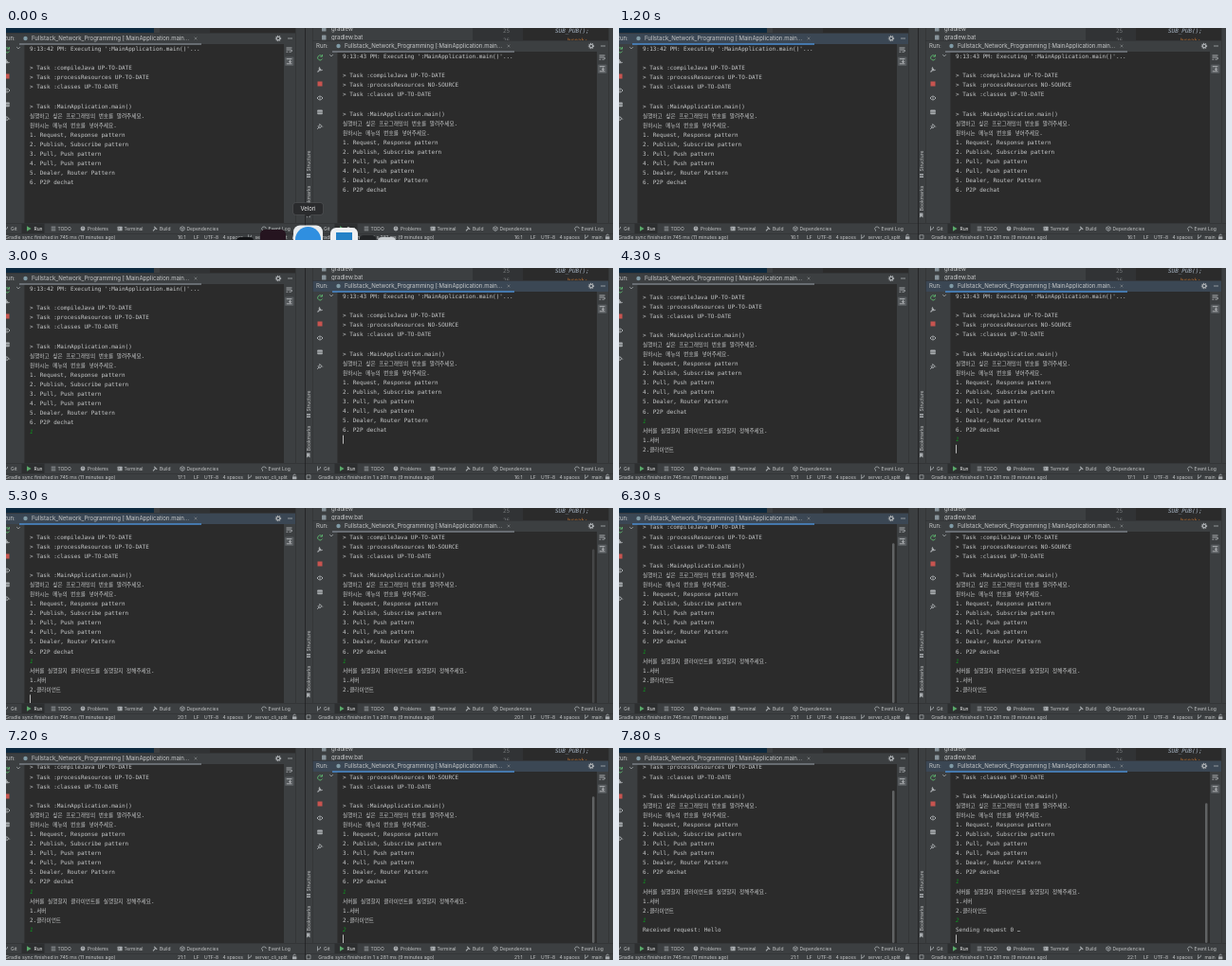
Write an HTML page with a canvas that moves like this. It is 640 by 224 pixels and loops after 8 s.

```html
<!DOCTYPE html>
<html lang="ko">
<head>
<meta charset="utf-8">
<style>
html, body { margin: 0; width: 640px; height: 224px; overflow: hidden; background: #2b2b2b; }
canvas { display: block; }
</style>
</head>
<body>
<canvas id="stage" width="640" height="224"></canvas>
<script>
const g = document.getElementById('stage').getContext('2d');
const LOOP = 8000, ROW = 10.08, ADVANCE = 3.6, BOTTOM = 206;
const PANEL = '#3c3f41', EDITOR = '#2b2b2b', GUTTER = '#313335', LINE = '#323334';
const TEXT = '#c6c8c9', ICON = '#a8acaf';
const UI = 'Inter, sans-serif';
const MONO = '5.98px "DejaVu Sans Mono", monospace';
const HANGUL = '500 5.62px "Noto Sans CJK KR", "Noto Sans CJK", sans-serif';

const banner = (sec, res) => `9:13:${sec} PM: Executing ':MainApplication.main()'...

> Task :compileJava UP-TO-DATE
> Task :processResources ${res}
> Task :classes UP-TO-DATE

> Task :MainApplication.main()
실행하고 싶은 프로그래밍의 번호를 알려주세요.
원하시는 메뉴의 번호를 넣어주세요.
1. Request, Response pattern
2. Publish, Subscribe pattern
3. Pull, Push pattern
4. Pull, Push pattern
5. Dealer, Router Pattern
6. P2P dechat
`;
const question = '서버를 실행할지 클라이언트를 실행할지 정해주세요.\n1.서버\n2.클라이언트\n';

// focus: intervals with keyboard focus; steps: [time, text added to the console]
const left = {
  dx: 0, dy: 0, focus: [[700, 2700], [5300, 6500]],
  sync: '745 ms (11 minutes ago)', branch: 'server_cli_split', statusX: 181,
  steps: [[0, banner(42, 'UP-TO-DATE')], [1600, '1'], [2100, '\n'], [3400, question],
    [5600, '1'], [5800, '\n'], [7700, 'Received request: Hello\n']]
};
const right = {
  dx: 330, dy: 8, focus: [[2700, 5300], [6500, LOOP]],
  sync: '1 s 281 ms (9 minutes ago)', branch: 'main', statusX: 206,
  steps: [[0, banner(43, 'NO-SOURCE')], [3200, '1'], [3500, '\n'], [4000, ''], [4500, question],
    [6800, '2'], [7100, '\n'], [7600, 'Sending request 0 …\n']]
};

function box(x, y, w, h, color) {
  g.fillStyle = color;
  g.fillRect(x, y, w, h);
}
function disc(x, y, r, color) {
  g.fillStyle = color;
  g.beginPath();
  g.arc(x, y, r, 0, 7);
  g.fill();
}
function round(x, y, w, h, r, color) {
  g.fillStyle = color;
  g.beginPath();
  g.roundRect(x, y, w, h, r);
  g.fill();
}
function stroke(path, x, y, color = ICON, width = 0.8) {
  g.save();
  g.translate(x, y);
  g.strokeStyle = color;
  g.lineWidth = width;
  g.stroke(new Path2D(path));
  g.restore();
}
// y is the visual middle of the letters
function label(s, x, y, size = 6.05, color = TEXT) {
  g.font = `${size}px ${UI}`;
  g.fillStyle = color;
  g.fillText(s, x, y + size * 0.35);
}
function code(s, x, y, color, style = '') {
  g.font = style + MONO;
  g.fillStyle = color;
  g.fillText(s, x, y + 2.1);
}
function consoleText(s, x, y) {
  if (/^[12]$/.test(s)) return code(s, x, y, '#0c961f', 'italic ');
  g.fillStyle = TEXT;
  for (const part of s.match(/[가-힣]+|[^가-힣]+/g) || []) {
    g.font = /[가-힣]/.test(part) ? HANGUL : MONO;
    g.fillText(part, x, y + 2.1);
    x += g.measureText(part).width;
  }
}

const rowsAt = (win, t) =>
  win.steps.filter(s => s[0] <= t).map(s => s[1]).join('').split('\n');
const lastBefore = (times, t) => Math.max(0, ...times.filter(v => v <= t));

function drawConsole(win, t, active) {
  const top = 17 + win.dy, height = BOTTOM - top;
  const rows = rowsAt(win, t), last = rows.length - 1;
  const shift = Math.max(0, 22 + win.dy + ROW * last - 201.8);
  const rowY = i => 22 + win.dy + ROW * i - shift;

  g.save();
  g.beginPath();
  g.rect(20, top, 273, height);
  g.clip();
  box(20, top, 273, height, EDITOR);
  rows.forEach((s, i) => consoleText(s, 25, rowY(i)));

  const starts = win.focus.map(f => f[0]);
  const times = win.steps.map(s => s[0]);
  const idle = t - lastBefore([...starts, ...times], t);
  if (active && idle % 1000 < 500) {
    box(25 + ADVANCE * rows[last].length, rowY(last) - 4.5, 1, 9, '#bbbbbb');
  }

  const scrolled = lastBefore(win.steps.filter(s => s[1].endsWith('\n')).map(s => s[0]), t);
  const alpha = Math.min(1, (850 - t + scrolled) / 100);
  if (shift && alpha > 0) {
    const thumb = height * height / (ROW * rows.length);
    g.globalAlpha = alpha;
    round(288, BOTTOM - thumb, 2.5, thumb, 1.2, '#606263');
  }
  g.restore();
}

function drawSideIcons(dy) {
  const x = 1;
  stroke('M2 -2 A2.6 2.6 0 1 0 2.6 1 M2.5 -3.5 V-1.3 H0.3', x, 23.5 + dy, '#59a869', 1);
  stroke('M-2.5 2.5 L1 -1 M0 -2.5 A1.8 1.8 0 1 0 2.5 0', x, 36 + dy, ICON, 1.1);
  box(x - 2.5, 48.5 + dy, 5, 5, '#c75450');
  stroke('M-3 0 Q0 -4 3 0 Q0 4 -3 0 M-.8 0 H.8', x, 66 + dy, ICON, 1);
  round(x - 2.8, 78.5 + dy, 5.6, 4.8, 0.8, ICON);
  box(x - 2.8, 80.7 + dy, 5.6, 0.6, PANEL);
  stroke('M-.5 -2.8 L2.8 .5 M.3 -2 L-1.6 .2 M2 -.3 L-.2 1.6 M-2 -.4 L.4 2 M-.8 .8 L-2.8 2.8', x, 96 + dy, ICON, 1);
  stroke('M-1.8 -.9 L0 .9 L1.8 -.9', 13, 21 + dy, ICON, 0.8);
}

function drawHeader(dy, active) {
  const y = 11 + dy;
  box(-7, 5 + dy, 312, 12, active ? '#3b4754' : PANEL);
  box(-7, 5 + dy, 312, 0.7, LINE);
  label('Run:', -3, y);
  disc(20.5, y, 2.2, '#7f9aa5');
  label('Fullstack_Network_Programming [:MainApplication.main...', 27, y);
  stroke('M-1.4 -1.4 L1.4 1.4 M1.4 -1.4 L-1.4 1.4', 200, y, '#8a8d8f', 0.6);
  g.setLineDash([1, 0.8]);
  stroke('M2.6 0 A2.6 2.6 0 1 1 2.6 -.01', 287, y, ICON, 1.2);
  g.setLineDash([]);
  stroke('M1.7 0 A1.7 1.7 0 1 1 1.7 -.01', 287, y, ICON, 1.2);
  stroke('M-2.5 0 H2.5', 299.5, y);
}

function drawBottom(win, t) {
  box(-15, BOTTOM, 330, 18, PANEL);
  box(-15, BOTTOM, 330, 0.7, LINE);
  box(16.5, 206.5, 24, 10.5, '#2d2f30');
  const y = 212, size = 4.95;
  stroke('M-1.5 -2.5 V2.5 M1.5 -2 V-1 Q1.5 .5 -1.5 1', 0, y);
  label('Git', 5, y, size);
  g.fillStyle = '#59a869';
  g.fill(new Path2D('M22 209.3 L26.6 212 L22 214.7 Z'));
  label('Run', 29.5, y, size, '#eeeeee');
  stroke('M-2.3 -1.8 H2.3 M-2.3 0 H2.3 M-2.3 1.8 H2.3', 50, y);
  label('TODO', 54.5, y, size);
  disc(81, y, 2.4, ICON);
  box(80.6, y - 1.5, 0.8, 1.8, PANEL);
  label('Problems', 86, y, size);
  round(117.6, y - 2.3, 5, 4.6, 0.6, ICON);
  stroke('M-1.4 -1 L-.3 0 L-1.4 1', 120, y, PANEL, 0.6);
  label('Terminal', 124.5, y, size);
  stroke('M-2 2.3 L1 -.8 M-.8 -2.2 L2.2 .8', 157, y, ICON, 1.2);
  label('Build', 162, y, size);
  stroke('M0 -2.4 L2.2 -1.2 V1.2 L0 2.4 L-2.2 1.2 V-1.2 Z M-2.2 -1.2 L0 0 L2.2 -1.2 M0 0 V2.4', 186, y, ICON, 0.7);
  label('Dependencies', 190.5, y, size);
  stroke('M2.3 0 A2.3 2 0 1 0 -1 1.8 L-2 2.5', 272, y);
  label('Event Log', 276.5, y, size);

  const seen = win.focus.some(f => t >= f[0] && t < f[1])
    ? t : lastBefore(win.focus.map(f => f[1]), t);
  const rows = rowsAt(win, seen), sx = win.statusX, sy = 220.8;
  box(-15, 217, 330, 0.7, LINE);
  stroke('M-2 -2 H2 V2 H-2 Z', -11, sy, ICON, 0.7);
  label('Gradle sync finished in ' + win.sync, -0.7, sy, 5.2);
  label(`${rows.length}:${rows[rows.length - 1].length + 1}`, sx, sy, size);
  label('LF', sx + 17, sy, size);
  label('UTF-8', sx + 28, sy, size);
  label('4 spaces', sx + 47.5, sy, size);
  stroke('M-1.3 -2.5 V2.5 M1.5 -2 V-1 Q1.5 .5 -1.3 1', sx + 76, sy);
  label(win.branch, sx + 81.5, sy, size);
  round(302, sy - 0.6, 4.4, 3, 0.5, ICON);
  stroke('M-1.2 0 V-1 A1.2 1.2 0 0 1 1.2 -1', 304.2, sy - 0.5);
}

function sideLabel(s, y) {
  g.save();
  g.translate(-11, y);
  g.rotate(-Math.PI / 2);
  g.textAlign = 'center';
  label(s, 0, 0, 5);
  g.restore();
}

function drawTop(win) {
  if (win === left) {
    box(-7, 0, 163, 5, '#0d293e');
    box(162, 0, 143, 5, EDITOR);
    box(162, 0, 53, 5, GUTTER);
    return;
  }
  box(162, 0, 143, 13, EDITOR);
  box(162, 0, 53, 13, GUTTER);
  for (const y of [1, 10]) round(3, y - 2.5, 4.5, 5, 0.6, '#87939a');
  label('gradlew', 13, 1);
  label('gradlew.bat', 13, 10);
  code('25', 194, 2.5, '#75787b');
  code('26', 194, 12.5, '#75787b');
  code('SUB_PUB();', 249, 2.5, '#a9b7c6', 'italic ');
  code('break;', 262, 12.5, '#cc7832');
}

function drawWindow(win, t) {
  const { dx, dy } = win;
  const active = win.focus.some(f => t >= f[0] && t < f[1]);
  g.save();
  g.beginPath();
  g.rect(dx - 15, 0, 330, 224);
  g.clip();
  g.translate(dx, 0);
  box(-15, 0, 330, 224, PANEL);
  drawTop(win);
  drawHeader(dy, active);
  drawSideIcons(dy);
  box(19, 17 + dy, 1, BOTTOM - 17 - dy, LINE);
  drawConsole(win, t, active);
  box(14, 16.2 + dy, 192, 1.6, active ? '#4a88c7' : '#747a80');

  stroke('M-3 -2 H3 M-3 0 H1.5 Q3.3 0 3 1.2 T1 2.2 H0 M-3 2.2 H-1.3', 298.5, 23 + dy, ICON, 1);
  round(294, 30.5 + dy, 9.5, 9.5, 1, '#55595c');
  stroke('M-2.8 -2.5 H2.8 M-2.8 2.6 H2.8 M1 -1.5 V1.3 M-.4 0 L1 1.5 L2.4 0', 298.6, 35.2 + dy, '#c4c6c8');

  for (const x of [-7, 305]) box(x, 0, 0.7, BOTTOM, LINE);
  sideLabel('Structure', 140.5);
  sideLabel('Bookmarks', 180);
  for (const y of [154, 156.5]) box(-13, y, 4, 1.5, ICON);
  g.fillStyle = ICON;
  g.fill(new Path2D('M-13 195.5 H-9.5 V200.5 L-11.2 199 L-13 200.5 Z'));
  drawBottom(win, t);
  box(-15, 0, 0.8, 224, '#202122');
  g.restore();
}

function drawDock(t) {
  if (t >= 200) return;
  g.save();
  if (t < 100) {
    round(302.5, 184.5, 32, 13, 2.5, '#505254');
    round(303, 185, 31, 12, 2.2, '#2a2b2d');
    g.fill(new Path2D('M315 197 H322 L318.5 200 Z'));
    g.textAlign = 'center';
    label('Velori', 318.5, 191, 6, '#e8e8e8');
    g.textAlign = 'left';
  }
  g.translate(0, 36 * Math.max(0, (t - 90) / 110));
  round(243, 221, 18, 18, 4, '#131416');
  round(268, 213, 27, 27, 5, '#25141f');
  round(303, 208.5, 31, 31, 7, '#e9ecee');
  disc(318.5, 223.5, 13.5, '#2f8fe0');
  round(342, 211, 29, 29, 6, '#eef0f2');
  box(348, 216, 17, 17, '#2582c7');
  round(373, 219, 17, 18, 4, '#222426');
  round(392, 221, 19, 18, 4, '#c9cdd0');
  g.restore();
}

function frame(now) {
  const t = now % LOOP;
  drawWindow(left, t);
  drawWindow(right, t);
  drawDock(t);
  requestAnimationFrame(frame);
}
requestAnimationFrame(frame);
</script>
</body>
</html>
```
